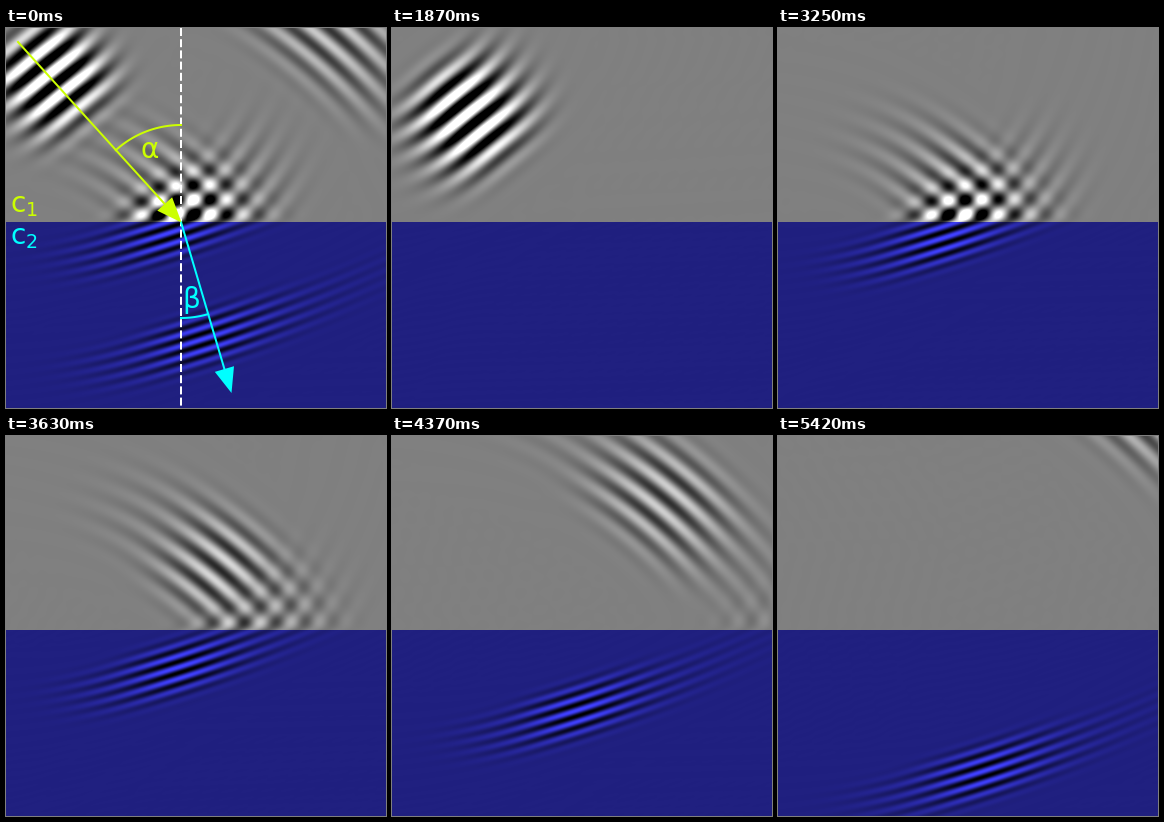
A matplotlib script for the animation above (5.47 s loop, 380 px wide and 380 px high).

```python
import numpy as np
import matplotlib.pyplot as plt
from matplotlib.animation import FuncAnimation
from matplotlib.patches import Polygon

SIZE, EDGE = 380, 194            # stage and height of the interface, px
LOOP, TICK = 5470, 10            # ms
INTRO, STEP, LAST = 1500, 53, 74
PT = 0.72                        # points per pixel at 100 dpi
LIME, CYAN = "#ccff00", "#00ffff"

# Wave packet: px and ms
SPEED, INDEX, WAVELENGTH = 0.124, 2.05, 22.5
ANGLE = np.radians(39)
HIT_X, HIT_TIME, WAIST = 163, 2970, 230
HALF_LENGTH, HALF_WIDTH = 50, 48
AMPLITUDE, PHASE, LOWER_GAIN = 1.7, 0.88, 1.1


def lobe(k, half):
    """Fourier transform of a pulse with a slightly flattened top."""
    s = np.arange(-3 * half, 3 * half + 1, 2)
    pulse = np.exp(-np.abs(s / half) ** 3)
    return np.cos(k[..., None] * s) @ pulse


# Plane-wave spectrum of the packet around its carrier
sin_a, cos_a = np.sin(ANGLE), np.cos(ANGLE)
k0 = 2 * np.pi / WAVELENGTH
spread = 2 * np.pi / 800 * np.arange(-20, 21)
kx, kz = k0 * sin_a + spread, k0 * cos_a + spread
KX, KZ = np.meshgrid(kx, kz, indexing="ij")
K = np.hypot(KX, KZ)
k_long = KX * sin_a + KZ * cos_a - k0
k_side = KX * cos_a - KZ * sin_a
weight = lobe(k_long, HALF_LENGTH) * lobe(k_side, HALF_WIDTH)
weight *= AMPLITUDE / weight.sum()
waist_x, waist_z = HIT_X - WAIST * sin_a, -WAIST * cos_a
spectrum = weight * np.exp(1j * (PHASE - KX * waist_x - KZ * waist_z))

# Fresnel coefficients for each plane wave
KZ2 = np.sqrt((INDEX * K) ** 2 - KX ** 2)
reflect = (KZ - KZ2) / (KZ + KZ2)
transmit = 1 + reflect

x = np.arange(SIZE) + 0.5
z_up = np.arange(EDGE) + 0.5 - EDGE
z_low = np.arange(SIZE - EDGE) + 0.5
wave_x = np.exp(1j * np.outer(kx, x))
wave_up = np.exp(1j * np.outer(kz, z_up))
wave_low = np.exp(1j * KZ2[:, :, None] * z_low)


def spectrum_at(ms):
    travelled = SPEED * (ms - HIT_TIME) + WAIST
    return spectrum * np.exp(-1j * K * travelled)


def upper(ms):
    s = spectrum_at(ms)
    columns = s @ wave_up + (s * reflect) @ wave_up.conj()
    return (columns.T @ wave_x).real


def lower(ms):
    s = spectrum_at(ms) * transmit
    columns = np.einsum("ab,abz->az", s, wave_low)
    return LOWER_GAIN * (columns.T @ wave_x).real


def picture(*moments):
    """Superpose the waves of the given moments and colour both media."""
    up = sum(upper(t) for t in moments)
    low = sum(lower(t) for t in moments)
    top = (1 + up)[:, :, None] * np.array([128, 128, 128])
    bottom = (1 + low)[:, :, None] * np.array([32, 32, 128])
    # the lower medium saturates at twice its resting colour
    bottom = np.minimum(bottom, [64, 64, 255])
    return np.clip(np.vstack([top, bottom]), 0, 255).astype(np.uint8)


overview = picture(1460, 3160, 5000)
pictures = [picture(INTRO + STEP * n) for n in range(LAST + 1)]

fig = plt.figure(figsize=(3.8, 3.8), dpi=100)
ax = fig.add_axes([0, 0, 1, 1])
ax.axis("off")
screen = ax.imshow(overview, extent=(0, SIZE, SIZE, 0),
                   interpolation="nearest", aspect="auto")
ax.set_xlim(0, SIZE)
ax.set_ylim(SIZE, 0)
labels = []


def line(xs, ys, color, **style):
    labels.extend(ax.plot(xs, ys, color=color, lw=2 * PT, **style))


def arrow(tail, tip, color, length=25, half=10):
    tail, tip = np.array(tail), np.array(tip)
    along = (tip - tail) / np.hypot(*(tip - tail))
    side = np.array([-along[1], along[0]]) * half
    base = tip - along * length
    line([tail[0], base[0]], [tail[1], base[1]], color)
    head = Polygon([tip, base + side, base - side], fc=color, ec="none", zorder=3)
    labels.append(ax.add_patch(head))


def arc(radius, start, end, color):
    a = np.radians(np.linspace(start, end, 40))
    line(175 + radius * np.sin(a), EDGE - radius * np.cos(a), color)


def text(px, py, s, color, size=28):
    labels.append(ax.text(px, py, s, color=color, fontsize=size * PT,
                          family="DejaVu Sans", va="baseline"))


line([174.5, 174.5], [0, SIZE], "white", dashes=(4, 1.6), dash_capstyle="butt")
arc(97, -42.2, 0, LIME)
arc(96, 180, 163.6, CYAN)
arrow((12, 14), (175.5, 194.5), LIME)
arrow((175, 194), (225.5, 365), CYAN)
text(134.5, 129.5, "α", LIME)
text(176, 280, "β", CYAN)
for name, base, color in (("1", 184.5, LIME), ("2", 215.5, CYAN)):
    text(4.5, base, "c", color)
    text(19.5, base + 4, name, color, 19)


def draw(i):
    ms = i * TICK
    intro = ms < INTRO
    step = min(LAST, (ms - INTRO + 5) // STEP)
    screen.set_data(overview if intro else pictures[step])
    for item in labels:
        item.set_visible(intro)
    return [screen, *labels]


anim = FuncAnimation(fig, draw, frames=LOOP // TICK, interval=TICK,
                     repeat=True, repeat_delay=0, blit=False)
plt.show()
```
